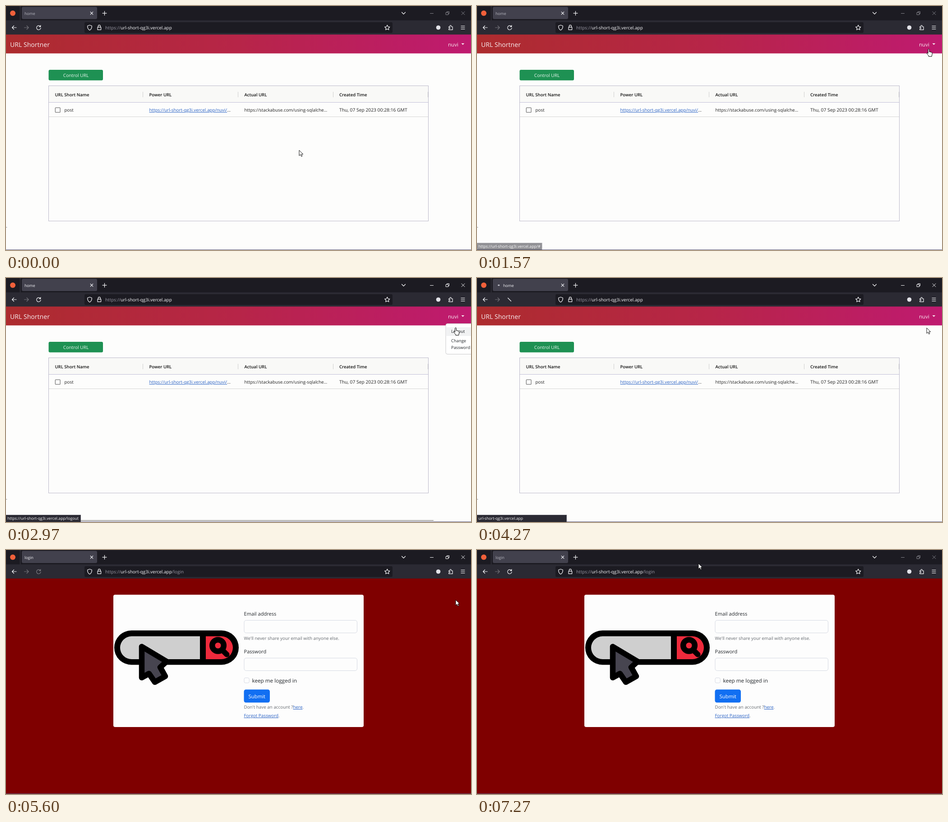
An HTML page that plays this animation: 1031 by 543 pixels, repeating every 7.31 s.

```html
<!DOCTYPE html>
<html lang="en">
<head>
<meta charset="utf-8">
<title>URL Shortner</title>
<style>
html, body { margin: 0; width: 100%; height: 100%; overflow: hidden; background: #fdfdfc; }
svg { display: block; }
text { font-family: "Open Sans", "Noto Sans", sans-serif; text-rendering: geometricPrecision; white-space: pre; }
[data-on] { visibility: hidden; }
.line { fill: none; stroke: #fbfbfe; stroke-width: 1.2; stroke-linecap: round; stroke-linejoin: round; }
.small { font-size: 8.7px; fill: #fbfbfe; }
.win { stroke: #85858c; stroke-width: 1; }
.title { fill: #b9b9c2; }
.active .win { stroke: #fbfbfe; }
.active .title { fill: #fbfbfe; }
.url { font-size: 9.97px; fill: #9a99a5; }
.host { fill: #fbfbfe; }
.head { font-size: 9.55px; font-weight: 600; fill: #111; }
.cell { font-size: 9.85px; fill: #222; }
.link { fill: #2a62c4; text-decoration: underline; }
.label { font-size: 11.05px; fill: #212529; }
.note { font-size: 9.85px; fill: #666b70; }
.field { fill: #fdfdfd; stroke: #d6dae3; }
.status rect { fill: #2b2a33; stroke: #55545f; }
</style>
</head>
<body>
<svg id="stage" width="1031" height="543" viewBox="0 0 1031 543">
  <defs>
    <linearGradient id="bar">
      <stop offset="0" stop-color="#ad2c2e"/>
      <stop offset=".5" stop-color="#b72548"/>
      <stop offset="1" stop-color="#bf1a70"/>
    </linearGradient>
  </defs>

  <!-- browser -->
  <rect width="1031" height="32" fill="#1c1b22"/>
  <circle cx="15" cy="16" r="6" fill="#f0603a"/>
  <path d="M31.5 0V32" stroke="#3b3a44"/>
  <rect x="35" y="2" width="167" height="27" rx="3" fill="#42414d"/>
  <text id="tab" class="small title" x="41" y="19.5">home</text>
  <ellipse id="dot" cy="16" rx="2.2" ry="1.5"/>
  <path class="line" d="M187.2 13.2l5.6 5.6m0-5.6l-5.6 5.6M214 16.2h9m-4.500-4.500v9M877.500 14l4 4 4-4"/>
  <path class="line win" d="M940.500 16.500h7M975.500 14.500h5v5h-5zM977.500 14.500v-2h5v5h-2M1010 12.500l7 7m0-7l-7 7"/>

  <rect y="32" width="1031" height="32" fill="#2b2a33"/>
  <rect x="174" y="36" width="683" height="24" rx="3" fill="#1c1b22"/>
  <path class="line" d="M23 48h-9.500m4-4l-4 4 4 4"/>
  <path class="line" opacity=".35" d="M40.500 48h9.500m-4-4l4 4-4 4"/>
  <g id="reload" class="line">
    <path d="M76.300 45.600a4.700 4.700 0 1 0 .8 3.200"/>
    <path d="M77 43v3.400h-3.400z" fill="#fbfbfe" stroke-width=".6"/>
  </g>
  <path id="stop" class="line" d="M68.500 44.500l7 7"/>
  <path class="line" data-on="4340 5560" d="M75.500 44.500l-7 7"/>
  <path class="line" d="M185.500 42.500l4.800 1.700q.2 7-4.800 9.600-5-2.600-4.800-9.600z"/>
  <path class="line" d="M203 47.200h7.600v5.600H203zm1.400 0v-2.400a2.400 2.400 0 0 1 4.800 0v2.400"/>
  <text class="url" x="220" y="52">https://<tspan class="host">url-short-qg3i.vercel.app</tspan><tspan data-on="5230 7310">/login</tspan></text>
  <path class="line" d="M845.300 42.500l1.700 3.500 3.900.5-2.800 2.700.7 3.800-3.500-1.800-3.500 1.800.7-3.800-2.800-2.700 3.900-.5z"/>
  <circle cx="958.500" cy="48" r="4.800" fill="#e4e4ea"/>
  <path class="line" d="M981.800 46h2.400v-1.500a1.500 1.500 0 0 1 3 0V46h2.900v6.800h-8.300v-2.300h1.300a1.300 1.300 0 0 0 0-2.600h-1.300z"/>
  <path class="line" d="M1009 44.500h8M1009 48h8M1009 51.500h8"/>

  <!-- links page -->
  <g data-on="0 5560">
    <rect y="64" width="1031" height="479" fill="#fdfdfc"/>
    <rect y="63.500" width="1031" height="42" fill="url(#bar)"/>
    <text x="9" y="91" font-size="14.100" fill="#f8eef0">URL Shortner</text>
    <text x="980" y="90" font-size="11.600" fill="#f8e8f0">nuvi</text>
    <path d="M1009.500 83h6.800l-3.400 3.600z" fill="#f8e8f0"/>

    <rect x="94.500" y="142" width="120.500" height="23.500" rx="3" fill="#1e9153"/>
    <text x="155" y="157.500" font-size="10.150" fill="#eaf6ef" text-anchor="middle">Control URL</text>

    <rect x="95" y="178" width="841" height="36" fill="#f9f9f7"/>
    <rect x="94.500" y="177.500" width="842" height="301" fill="none" stroke="#bcbacb"/>
    <path d="M95 214.500H936" stroke="#c2c0d8"/>
    <path d="M95 246.500H936" stroke="#d4d4d4"/>
    <path d="M303.500 191v12M514.500 191v12M725.500 191v12M935.500 191v12" stroke="#cfcfcf"/>
    <g class="head">
      <text x="108.500" y="200.500">URL Short Name</text>
      <text x="317.500" y="200.500">Power URL</text>
      <text x="528.500" y="200.500">Actual URL</text>
      <text x="739" y="200.500">Created Time</text>
    </g>
    <rect x="109.300" y="226.300" width="10.800" height="10.400" rx="1" fill="none" stroke="#777" stroke-width="1.300"/>
    <g class="cell">
      <text x="129.500" y="235.200">post</text>
      <text x="317.500" y="235.200"><tspan class="link">https://url-short-qg3i.vercel.app/nuvi/</tspan>…</text>
      <text x="528.500" y="235.200">https://stackabuse.com/using-sqlalche…</text>
      <text x="739" y="235.200" font-size="10.300" style="font-size:10.3px">Thu, 07 Sep 2023 00:28:16 GMT</text>
    </g>
    <text class="cell" x="0" y="493">.</text>

    <g data-on="1950 4180">
      <path d="M0 539.500H948" stroke="#5c5c5c"/>
      <rect x="975" y="101.500" width="70" height="68" rx="4" fill="#fff" stroke="#c9c9cb"/>
      <rect data-on="2500 4180" x="975.500" y="109.500" width="60" height="19.500" fill="#f1f2f3"/>
      <g font-size="9.400" fill="#212529">
        <text x="987" y="122">Logout</text>
        <text x="987" y="143">Change</text>
        <text x="987" y="157.500">Password</text>
      </g>
    </g>
  </g>

  <!-- login page -->
  <g data-on="5560 7310">
    <rect y="63.500" width="1031" height="480" fill="#7f0000"/>
    <rect x="238" y="99.500" width="555" height="294.500" rx="4" fill="#fdfdfd"/>
    <rect x="240" y="179" width="276" height="76.500" rx="38.200"/>
    <path d="M430 192V243H278.500a25.500 25.500 0 0 1 0-51z" fill="#cfcfcf"/>
    <path d="M443 192H477.500a25.500 25.500 0 0 1 0 51H443z" fill="#ee2a3c"/>
    <circle cx="470" cy="212.500" r="12.800" fill="#ee2a3c" stroke="#000" stroke-width="12.500"/>
    <path d="M480 223l9.500 9.500" stroke="#000" stroke-width="12" stroke-linecap="round"/>
    <path d="M301 215V284L317 275 330 294 353 281 342 261 356 248z" fill="#474550" stroke="#000" stroke-width="12.500" stroke-linejoin="round"/>

    <text class="label" x="527.500" y="146.200">Email address</text>
    <rect class="field" x="528" y="156.500" width="250.500" height="28" rx="4.500"/>
    <text class="note" x="527.500" y="200">We'll never share your email with anyone else.</text>
    <text class="label" x="527.500" y="230">Password</text>
    <rect class="field" x="528" y="240.500" width="250.500" height="28" rx="4.500"/>
    <rect class="field" x="528" y="284.500" width="11.300" height="11.300" rx="3"/>
    <text x="545.500" y="295" font-size="11.700" fill="#212529">keep me logged in</text>
    <rect x="527.500" y="310.500" width="57.500" height="29" rx="4.500" fill="#116ff2"/>
    <text x="556.300" y="330" font-size="11.400" fill="#fff" text-anchor="middle">Submit</text>
    <text class="note" x="527.500" y="353">Don't have an account ?<tspan class="link">here</tspan>.</text>
    <text class="note" x="527.500" y="372"><tspan class="link">Forgot Password</tspan>.</text>
  </g>

  <path d="M0 542.500H1031" stroke="#5b597c"/>
  <g id="statuses"></g>

  <g id="cursor" stroke="#000" stroke-linejoin="round" fill="#fff">
    <path id="arrow" d="M0 0V12.200L2.900 9.500 4.900 13.900 6.900 13 5 8.800H8.700Z" stroke-width=".9"/>
    <path id="hand" d="M-1.400 1.200a1.400 1.400 0 0 1 2.800 0V6l1.800.2 1.800.5 1.700.6q1 .4 1 1.500V11q0 2-1 4v1.300H0V15Q-1.500 13-4 10q-.6-1.200.4-1.700 1-.3 2.200 1.200Z"/>
  </g>
</svg>

<script>
const LOOP = 7310;
const CLICK = { menu: 1950, logout: 4200, redirect: 5230, loaded: 5560 };
const HOST = 'url-short-qg3i.vercel.app';
const $ = id => document.getElementById(id);

// text, panel width, start, end
const statuses = [
  [`https://${HOST}/#`, 144.5, 1520, 2500],
  [`https://${HOST}/logout`, 166, 2500, CLICK.logout],
  [HOST, 199, CLICK.logout, 4400],
  [`Waiting for ${HOST}…`, 203, 4400, CLICK.loaded]
];
$('statuses').innerHTML = statuses.map(([text, w, from, to]) =>
  `<g class="status" data-on="${from} ${to}"><rect x="-1" y="527.5" width="${w + .5}" height="17"/>` +
  `<text class="small" x="3" y="538.3">${text}</text></g>`).join('');

// time, x, y of the pointer
const track = [
  [0, 650, 321], [150, 650, 321], [1450, 1001.5, 96], [2250, 1001.5, 96],
  [2650, 997, 111], [6050, 997, 111], [7000, 491, 30], [LOOP, 491, 30]
];

const timed = [...document.querySelectorAll('[data-on]')].map(el => {
  const [from, to] = el.dataset.on.split(' ').map(Number);
  return { el, from, to };
});

const within = (t, from, to) => t >= from && t < to;
const clamp = v => Math.min(1, Math.max(0, v));
const smooth = v => v * v * (3 - 2 * v);
const show = (el, on) => { el.style.visibility = on ? 'visible' : 'hidden'; };

function pointer(t) {
  const i = track.findIndex(k => k[0] > t);
  const [t0, x0, y0] = track[i - 1], [t1, x1, y1] = track[i];
  const p = smooth((t - t0) / (t1 - t0));
  return [x0 + (x1 - x0) * p, y0 + (y1 - y0) * p];
}

function drawTab(t) {
  const loading = within(t, CLICK.logout, CLICK.loaded);
  const redirected = t >= CLICK.redirect;
  $('tab').textContent = t >= CLICK.loaded ? 'login' : redirected ? HOST + '/login' : 'home';
  $('tab').setAttribute('x', loading ? 58 : 41);
  show($('dot'), loading);
  const phase = (t - (redirected ? 4940 : 4000)) / 1050;
  $('dot').setAttribute('cx', 48.5 + 5.5 * Math.cos(phase * 2 * Math.PI));
  $('dot').setAttribute('fill', redirected ? '#2f86dd' : '#c6c6cf');
  show($('reload'), !loading);
  $('reload').style.opacity = within(t, CLICK.loaded, 6210) ? .4 : 1;
  show($('stop'), loading);
}

function draw(t) {
  for (const { el, from, to } of timed) show(el, within(t, from, to));
  $('stage').classList.toggle('active', within(t, CLICK.menu, 7150));
  $('statuses').style.opacity = clamp((t - 1520) / 100);
  drawTab(t);
  const hand = within(t, 1430, 4180);
  show($('hand'), hand);
  show($('arrow'), !hand);
  $('cursor').setAttribute('transform', `translate(${pointer(t)})`);
}

const start = performance.now();
function tick() {
  draw((performance.now() - start) % LOOP);
  requestAnimationFrame(tick);
}
tick();
</script>
</body>
</html>
```
